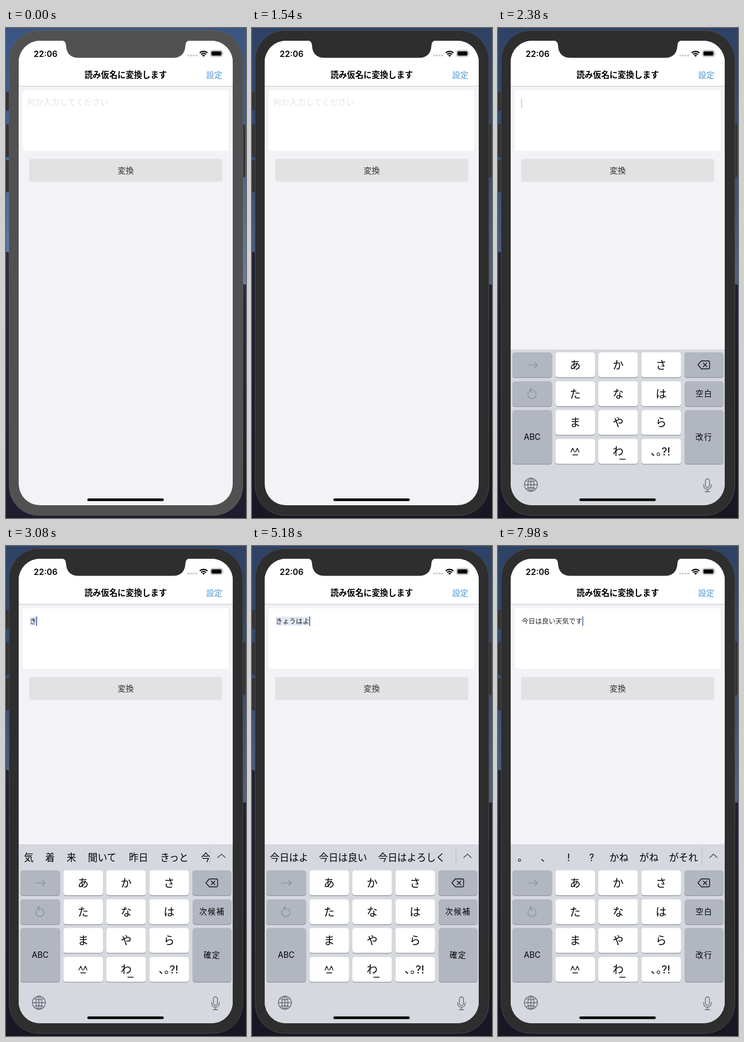
An HTML page that plays this animation: 416 by 846 pixels, repeating every 8 s.

```html
<!DOCTYPE html>
<html lang="ja">
<head>
<meta charset="utf-8">
<style>
html, body { margin: 0; width: 100%; height: 100%; overflow: hidden; background: #1f2133; }
svg { display: block; width: 416px; height: 846px; }
text { font-family: "Noto Sans CJK JP", "Noto Sans CJK", sans-serif; white-space: pre; }
.latin { font-family: Inter, sans-serif; }
.line { fill: none; stroke-linecap: round; stroke-linejoin: round; }
</style>
</head>
<body>
<svg viewBox="0 0 416 846">
  <defs>
    <linearGradient id="sky" x2="0" y2="1">
      <stop offset="0" stop-color="#3b5583"/>
      <stop offset=".25" stop-color="#46618f"/>
      <stop offset=".5" stop-color="#647ca6"/>
    </linearGradient>
    <linearGradient id="hill" x2="0" y2="1">
      <stop offset="0" stop-color="#2b2d43"/>
      <stop offset="1" stop-color="#1d1d2e"/>
    </linearGradient>
    <clipPath id="screenClip"><rect x="22" y="22" width="371" height="802" rx="37"/></clipPath>
    <clipPath id="barClip"><rect x="22" y="515" width="331" height="45"/></clipPath>
  </defs>
  <rect width="416" height="846" fill="url(#sky)"/>
  <path d="M0 386L8 389L405 442L416 443V846H0Z" fill="url(#hill)"/>
  <rect id="shade" width="416" height="846" fill="#000"/>
  <g fill="#353538" stroke="#222226" stroke-width=".8">
    <rect x="0" y="111" width="8" height="31" rx="1"/>
    <rect x="0" y="167" width="8" height="55" rx="1"/>
    <rect x="0" y="229" width="8" height="54" rx="1"/>
    <rect x="406" y="167" width="8" height="90" rx="1"/>
  </g>
  <rect id="bezel" x="5.5" y="4.5" width="405" height="837" rx="51"/>
  <g clip-path="url(#screenClip)">
    <rect x="22" y="22" width="371" height="802" fill="#f3f2f7"/>
    <rect x="22" y="22" width="371" height="78" fill="#fff"/>
    <rect x="22" y="100" width="371" height="1" fill="#c9c9cd"/>
    <rect x="29" y="107.5" width="357" height="104.5" rx="4" fill="#fff"/>
    <rect x="40" y="226" width="335" height="39.5" rx="4" fill="#e2e2e2"/>
    <g id="labels"></g>
    <g id="entry">
      <rect id="marked" x="41" y="122" height="15.5" fill="#e2e9f6"/>
      <rect id="caret" y="121.5" width="1.7" height="16.5" fill="#5470b8"/>
    </g>
    <g id="keyboard">
      <rect x="22" y="555" width="371" height="300" fill="#d6d8df"/>
      <g id="bar">
        <rect x="22" y="515" width="371" height="41" fill="#d6d8df"/>
        <g id="words" clip-path="url(#barClip)"></g>
        <path d="M353.5 520V551" stroke="#b9bcc5"/>
        <path class="line" d="M367 538L373.5 532L380 538" stroke="#4b4d55" stroke-width="1.4"/>
      </g>
      <g id="keys"></g>
      <g class="line" stroke="#858a96" stroke-width="1.2">
        <path d="M51 582H68M63.500 577.500L68 582L63.500 586.500"/>
        <path d="M53 628.500A7.200 7.200 0 1 0 59.500 625.500H54.500M58 622L54.500 625.500L58 629"/>
      </g>
      <g class="line" stroke="#17181b" stroke-width="1.4">
        <path d="M346.500 581.500L352.500 574.800H364.500Q366.700 574.800 366.700 577V586.500Q366.700 588.500 364.500 588.500H352.500ZM355.800 578.500L362 584.800M362 578.500L355.800 584.800"/>
        <path d="M126.500 732L129.500 725.500L132.500 732M134.500 732L137.500 725.500L140.500 732M129.500 737H138M211 744.500H220.500"/>
      </g>
      <g class="line" stroke="#666a75" stroke-width="1.3">
        <circle cx="57" cy="788.500" r="11.300"/>
        <ellipse cx="57" cy="788.500" rx="5.300" ry="11.300"/>
        <path d="M57 777V800M45.700 788.500H68.300M48.500 781.500Q57 785.500 65.500 781.500M48.500 795.500Q57 791.500 65.500 795.500"/>
        <rect x="359.500" y="778.500" width="7" height="14.500" rx="3.500"/>
        <path d="M356.500 788V790A6.500 6.500 0 0 0 369.500 790V788M363 796.500V800.500M359 800.500H367"/>
      </g>
    </g>
    <rect x="141" y="812.300" width="132.500" height="4.400" rx="2.200"/>
  </g>
  <path id="notch" d="M96 21.500Q104 22 104 30Q105 51.500 126 51.500H289Q310 51.500 311 30Q311 22 319 21.500Z"/>
  <g fill="#c9c9cb">
    <circle cx="316" cy="47.500" r="1.700"/><circle cx="320.600" cy="47.500" r="1.700"/>
    <circle cx="325.200" cy="47.500" r="1.700"/><circle cx="329.800" cy="47.500" r="1.700"/>
  </g>
  <g class="line" stroke="#000" stroke-width="2.200" style="stroke-linecap:butt">
    <path d="M335.800 43A9.600 9.600 0 0 1 349.200 43M338.300 45.700A6 6 0 0 1 346.700 45.700"/>
  </g>
  <path d="M342.500 49.800L340 47.200Q342.500 45.200 345 47.200Z"/>
  <rect x="354.500" y="38.700" width="20.500" height="10.600" rx="3" fill="none" stroke="#96969a"/>
  <rect x="356" y="40.200" width="17.500" height="7.600" rx="1.700"/>
  <path d="M376.500 42Q378 44 376.500 46Z" fill="#96969a"/>
</svg>
<script>
const LOOP = 8000;
const ACTIVATE = 1120;
const FOCUS = 1820;
const $ = id => document.getElementById(id);

function add(parent, tag, attrs, content = '') {
  const node = document.createElementNS('http://www.w3.org/2000/svg', tag);
  for (const name in attrs) node.setAttribute(name, attrs[name]);
  node.textContent = content;
  return parent.appendChild(node);
}

function label(parent, x, middle, content, size, attrs = {}) {
  return add(parent, 'text', { x, y: middle + size * .37, 'font-size': size, ...attrs }, content);
}

const centred = { 'text-anchor': 'middle' };
const latin = { class: 'latin' };

const labels = $('labels');
label(labels, 48, 44.3, '22:06', 14.4, { ...latin, 'font-weight': 600 });
label(labels, 207.5, 81, '読み仮名に変換します', 14.3, { ...centred, 'font-weight': 700 });
label(labels, 347, 81, '設定', 14, { fill: '#4a97dc' });
label(labels, 207.5, 246, '変換', 14, { ...centred, fill: '#333' });
const hint = label(labels, 36.5, 128, '何か入力してください', 14.2, { fill: '#e3e3e6' });
const typed = label($('entry'), 41, 130, '', 11.7, { fill: '#222' });

// Keys: left, top, width, height, dark, label
const keys = $('keys');
function key(x, y, w, h, dark, content, size = 19, attrs = {}) {
  add(keys, 'rect', { x, y: y + 1.2, width: w, height: h, rx: 4.5, fill: '#92959f' });
  add(keys, 'rect', { x, y, width: w, height: h, rx: 4.5, fill: dark ? '#b2b6c1' : '#fff' });
  return label(keys, x + w / 2, y + h / 2, content, size, { ...centred, ...attrs });
}
const columns = [99.5, 174, 248.5];
const rows = [560, 610, 659.5, 709.5];
['あかさ', 'たなは', 'まやら', ' わ '].forEach((row, r) =>
  [...row].forEach((kana, c) => key(columns[c], rows[r], 68.5, 43, false, kana)));
label(keys, 265, 731, '､｡', 19);
label(keys, 283.5, 731, '?!', 19, latin);
key(25, rows[0], 68.5, 43, true, '');
key(25, rows[1], 68.5, 43, true, '');
key(25, rows[2], 68.5, 93, true, 'ABC', 14, latin);
key(323, rows[0], 67.5, 43, true, '');
const spaced = { 'letter-spacing': 1.5 };
const spaceKey = key(323.7, rows[1], 67, 43, true, '', 13.3, spaced);
const enterKey = key(323.7, rows[2], 67, 93, true, '', 13.3, spaced);

// Each step: time, entered text, candidates as [x, word] pairs
const steps = [
  [FOCUS, '', []],
  [2730, 'き', [[31, '気'], [68, '着'], [105, '来'], [142, '聞いて'], [213, '昨日'], [267, 'きっと'], [338, '今日']]],
  [3150, 'きよ', [[31, '今日'], [86, '今日は'], [155, '清'], [193, '去年'], [247, '器用'], [301, '寄与']]],
  [3430, 'きょ', [[31, '今日'], [86, '今日は'], [155, '去年'], [209, '許可'], [263, '距離'], [316, '興味']]],
  [3710, 'きょう', [[31, '今日'], [86, '今日は'], [155, '7/5'], [200, '2019/07/05'], [316, 'キョウ']]],
  [4340, 'きょうは', [[31, '今日は'], [100, '今日はありがとう'], [253, '今日は何']]],
  [4900, 'きょうはよ', [[31, '今日はよ'], [116, '今日は良い'], [218.5, '今日はよろしく']]],
  [5530, 'きょうはよい', [[31, '今日は良い'], [134, '今日は良い天気'], [270, '今日はよい']]],
  [6300, 'きょうはよいて', [[31, '今日は良いて'], [150, '今日は良い天気です'], [319.5, '今日は良い']]],
  [7490, '今日は良い天気です', [[34, '。'], [74, '、'], [120, '!'], [158, '?'], [193, 'かね'], [245, 'がね'], [296.5, 'がそれ']]]
];

let shown = null;
function showStep(step) {
  if (step === shown) return;
  shown = step;
  const [, text, words] = step || [0, '', []];
  const composing = text !== '' && step !== steps.at(-1);
  typed.textContent = text;
  $('marked').setAttribute('width', composing ? text.length * 11.75 : 0);
  $('caret').setAttribute('x', text ? 40.4 + text.length * 11.75 : 40);
  $('bar').style.display = words.length ? '' : 'none';
  $('words').replaceChildren();
  for (const [x, word] of words)
    label($('words'), x, 538, word, 16.7, /^[\d/!?]+$/.test(word) ? latin : {});
  spaceKey.textContent = composing ? '次候補' : '空白';
  enterKey.textContent = composing ? '確定' : '改行';
}

function caretOpacity(idle) {
  const phase = idle % 1000;
  if (phase < 480) return 1;
  if (phase < 600) return 1 - (phase - 480) / 120;
  return phase > 900 ? (phase - 900) / 100 : 0;
}

function render(time) {
  const active = time >= ACTIVATE;
  $('bezel').setAttribute('fill', active ? '#2e2e2e' : '#515151');
  $('bezel').setAttribute('stroke', active ? '#464648' : '#5b5b5c');
  $('notch').setAttribute('fill', active ? '#2e2e2e' : '#515151');
  $('shade').setAttribute('opacity', active ? .22 : 0);

  const step = steps.findLast(([at]) => at <= time);
  showStep(step);
  hint.style.display = step ? 'none' : '';
  $('caret').setAttribute('opacity', step ? caretOpacity(time - step[0]) : 0);

  const rise = Math.min(1, Math.max(0, (time - FOCUS) / 420));
  $('keyboard').setAttribute('transform', `translate(0 ${270 * (1 - rise) ** 3})`);
}

const start = performance.now();
function tick() {
  render((performance.now() - start) % LOOP);
  requestAnimationFrame(tick);
}
tick();
</script>
</body>
</html>
```
